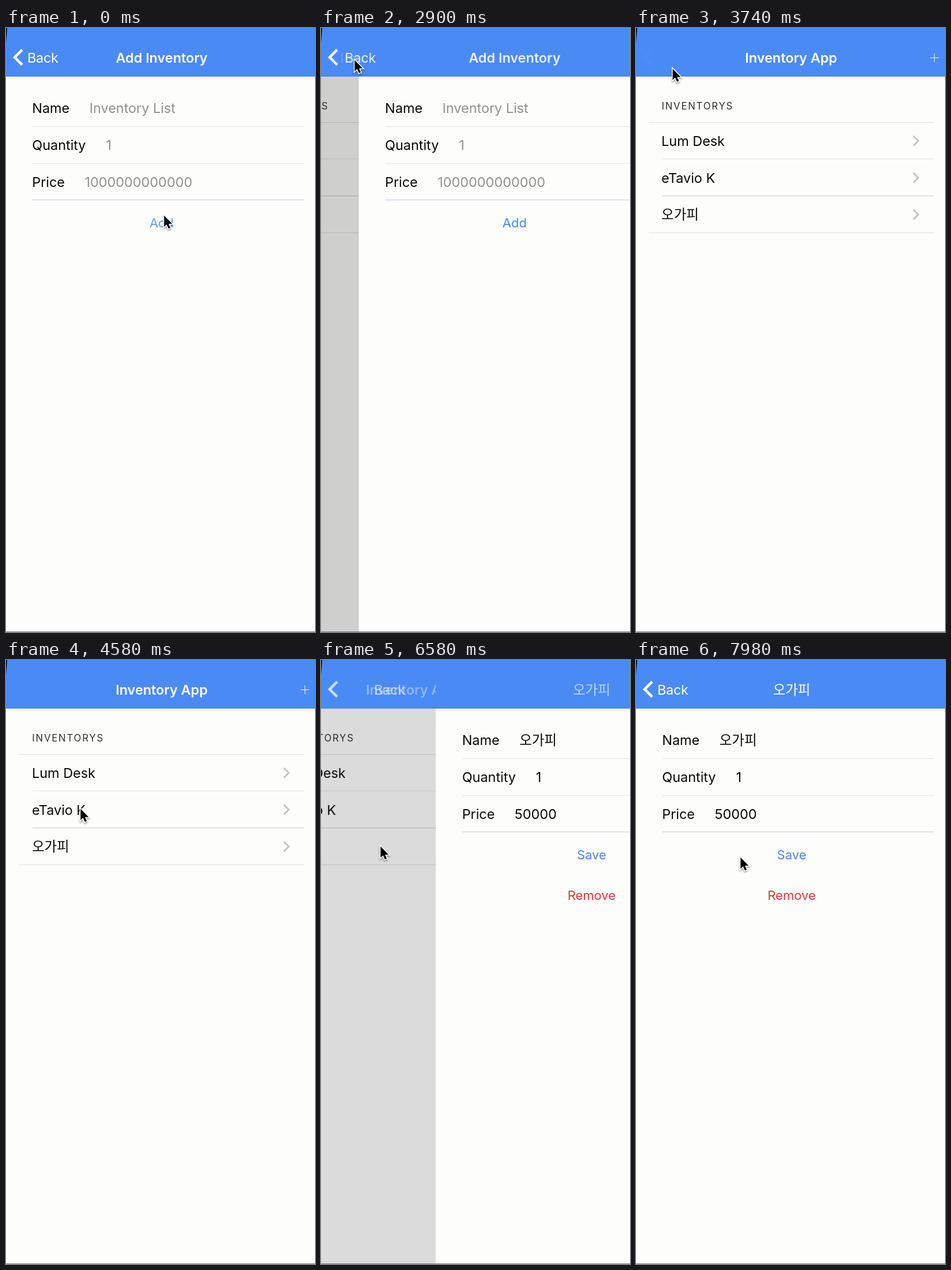
An HTML page with a canvas that plays this animation: 536x1045 px, repeating every 8000 ms.

```html
<!DOCTYPE html>
<html lang="en">
<head>
<meta charset="utf-8">
<title>Inventory App</title>
<style>
html, body { margin: 0; width: 100%; height: 100%; overflow: hidden; background: #fdfdfc; }
canvas { display: block; }
</style>
</head>
<body>
<canvas id="stage" width="536" height="1045"></canvas>
<script>
const W = 536, H = 1045, BAR = 84, LOOP = 8000;
const BLUE = '#4a8af5', PAGE = '#fdfdfc', INK = '#0a0a0a', GREY = '#929292';
const FAMILY = 'Inter, "Noto Sans CJK KR", "Noto Sans CJK", sans-serif';
const ctx = document.getElementById('stage').getContext('2d');

const addForm = {
  title: 'Add Inventory', weight: 600, color: GREY, values: ['Inventory List', '1', '1000000000000'],
  buttons: [['Add', '#4a86ee']]
};
const editForm = {
  title: '오가피', weight: 500, color: INK, values: ['오가피', '1', '50000'],
  buttons: [['Save', '#4a86ee'], ['Remove', '#e0343c']]
};
const fields = [['Name', 144.8], ['Quantity', 173.5], ['Price', 136.5]];
const items = ['Lum Desk', 'eTavio K', '오가피'];

// Pointer stops: step, x, y
const stops = [
  [0, 273, 322], [15, 273, 322], [34, 61, 64], [40, 61, 64], [52, 57, 53], [76, 57, 53],
  [94, 128, 255], [110, 128, 255], [124, 102, 320], [148, 102, 320], [168, 180, 339]
];

function text(str, x, y, { size = 23.5, weight = 400, color = INK, align = 'left', spacing = -0.06 } = {}) {
  ctx.font = `${weight} ${size}px ${FAMILY}`;
  ctx.letterSpacing = spacing + 'px';
  ctx.textAlign = align;
  ctx.fillStyle = color;
  ctx.fillText(str, x, y);
}

function rect(color, x, y, w, h) {
  ctx.fillStyle = color;
  ctx.fillRect(x, y, w, h);
}

function line(color, width, ...points) {
  ctx.beginPath();
  points.forEach(([x, y]) => ctx.lineTo(x, y));
  ctx.strokeStyle = color;
  ctx.lineWidth = width;
  ctx.stroke();
}

// Draws with its own offset, opacity and optional clip to the left of `edge`
function layer(dx, alpha, draw, edge) {
  ctx.save();
  if (edge !== undefined) {
    ctx.beginPath();
    ctx.rect(0, 0, edge, H);
    ctx.clip();
  }
  ctx.translate(dx, 0);
  ctx.globalAlpha = alpha;
  draw();
  ctx.restore();
}

function drawList() {
  text('INVENTORYS', 45.3, 140.6, { size: 16.8, spacing: 1.75, color: '#303030' });
  rect('#dcdce0', 23, 163, 494, 1);
  rect('#e8e6dc', 46, 226, 471, 1);
  rect('#c9c9c8', 46, 290, 471, 1);
  rect('#dedee2', 23, 354, 494, 1);
  items.forEach((name, i) => {
    const y = 195.3 + i * 63.7;
    text(name, 45, y + 8.6);
    line('#c5c5c9', 3, [482, y - 8.4], [490.5, y], [482, y + 8.4]);
  });
}

function drawForm(form, step) {
  rect(PAGE, 0, BAR, W, H);
  const rules = ['#dddbe6', '#e4e1f0', '#c8c7de'];
  fields.forEach(([label, x], i) => {
    const y = 147 + i * 63.8;
    text(label, 45.3, y);
    text(form.values[i], x, y, { color: form.color });
    rect(rules[i], 46, [170, 234, 297][i], 471, 1);
  });
  form.buttons.forEach(([label, color], i) => {
    ctx.globalAlpha = Math.min(1, 0.82 + step * 0.045);
    text(label, 270, 344.7 + i * 70.7, { size: 22, color, align: 'center', spacing: 0 });
  });
}

function drawTitle(str, weight) {
  text(str, 270, 60, { weight, color: '#fff', align: 'center' });
}

function drawHeader(form, gap, edge, shift) {
  rect(BLUE, 0, 0, W, BAR);
  rect('#4079dc', 0, BAR - 1, W, 1);
  layer(shift, gap, () => {
    drawTitle('Inventory App', 600);
    line('rgba(255,255,255,.9)', 1, [511, 51.5], [526, 51.5]);
    line('rgba(255,255,255,.9)', 1, [518.5, 44], [518.5, 59]);
  }, edge);
  layer(0, (1 - gap) ** 0.7, () => line('#fff', 4.5, [28, 37.7], [15, 50.7], [28, 63.7]));
  layer(W * gap ** 2.3, 1 - gap, () => text('Back', 37, 60, { color: '#fff', spacing: -0.3 }));
  layer(edge, 1 - gap, () => drawTitle(form.title, form.weight));
}

function drawPointer(step) {
  const k = stops.findIndex(s => s[0] > step);
  let [, x, y] = stops[stops.length - 1];
  if (k > 0) {
    const [a, ax, ay] = stops[k - 1], [b, bx, by] = stops[k];
    const u = (step - a) / (b - a), e = u * u * (3 - 2 * u);
    x = ax + (bx - ax) * e;
    y = ay + (by - ay) * e;
  }
  ctx.save();
  ctx.translate(x + 1.3, y + 2.5);
  const arrow = new Path2D('M0 0V19.5L4.4 15.4 7.6 22.6 10.8 21.3 7.7 14.3H14Z');
  ctx.strokeStyle = '#fff';
  ctx.lineWidth = 3;
  ctx.shadowColor = 'rgba(0,0,0,.4)';
  ctx.shadowBlur = 3;
  ctx.shadowOffsetY = 2;
  ctx.stroke(arrow);
  ctx.shadowColor = 'transparent';
  ctx.fillStyle = '#000';
  ctx.fill(arrow);
  ctx.restore();
}

// Critically damped slide from 0 to 1
function slide(steps) {
  const t = Math.max(0, steps) * 0.379;
  const p = 1 - (1 + t) * Math.exp(-t);
  return p > 0.998 ? 1 : p;
}

function draw(time) {
  // Three uneven ticks every 140 ms: 100, 20, 20
  const rest = time % 140;
  const step = 3 * Math.floor(time / 140) + (rest >= 100) + (rest >= 120);
  const late = step > 100;
  const form = late ? editForm : addForm;
  const gap = late ? 1 - slide(step - 135.38) : slide(step - 59.41);
  const edge = W * gap, shift = (edge - W) / 3;

  rect(PAGE, 0, 0, W, H);
  layer(shift, 1, drawList, edge);
  rect(`rgba(0,0,0,${0.21 * (1 - gap)})`, 0, BAR, edge, H);
  layer(edge, 1, () => drawForm(form, step));
  drawHeader(form, gap, edge, shift);

  ctx.fillStyle = '#000';
  ctx.fill(new Path2D('M0 0H2Q1 14 0 26Z'));
  rect('#7c7c7c', 0, H - 1, W, 1);
  drawPointer(step);
}

const start = performance.now();
function tick() {
  draw((performance.now() - start) % LOOP);
  requestAnimationFrame(tick);
}
tick();
</script>
</body>
</html>
```
